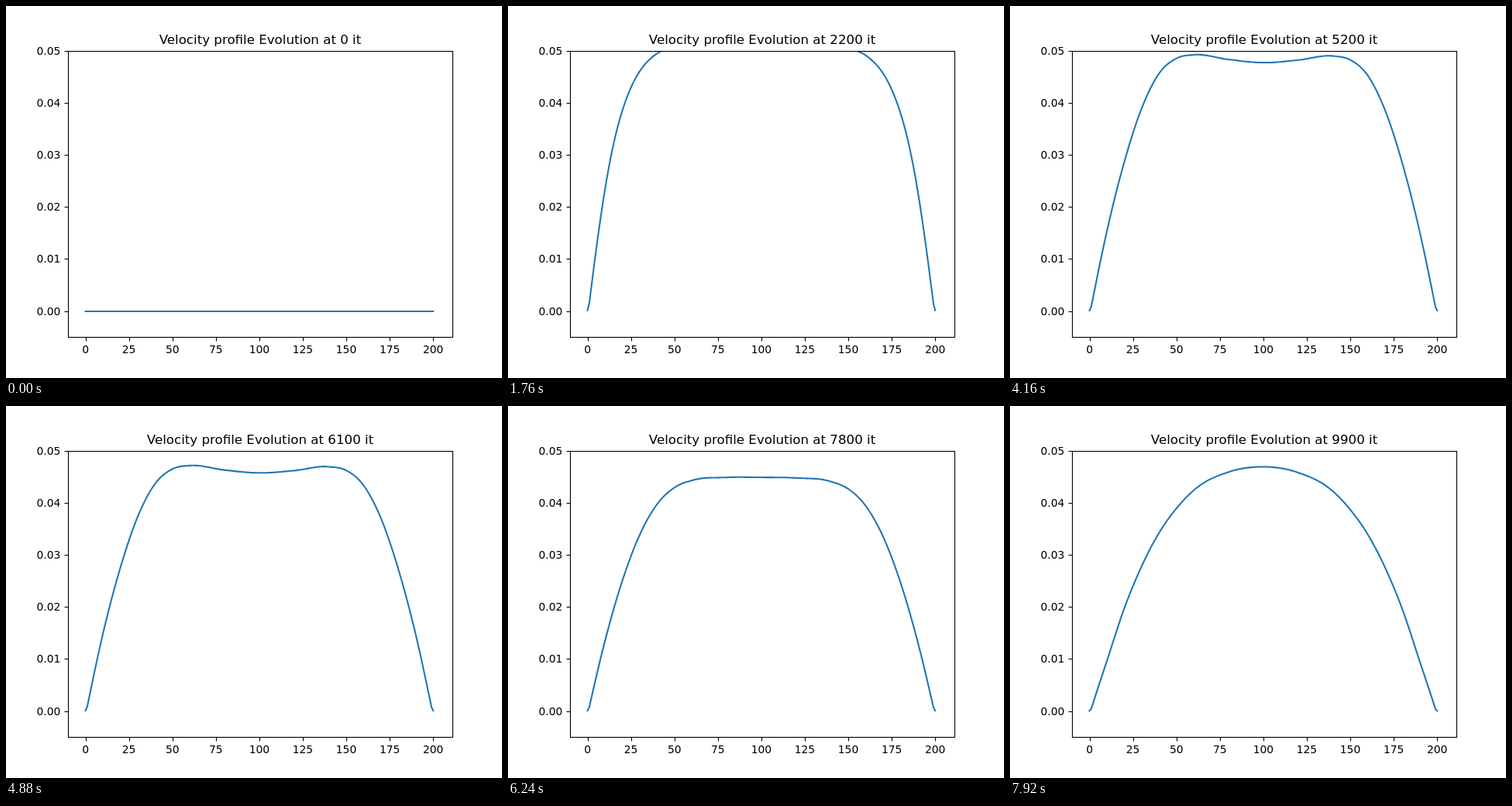
Write an HTML page that moves like this. It is 640 by 480 pixels and loops after 8 s.

```html
<!DOCTYPE html>
<html lang="en">
<head>
<meta charset="utf-8">
<title>Velocity profile</title>
<style>
  html, body { margin: 0; width: 100%; height: 100%; overflow: hidden; background: #fff; }
  svg { display: block; width: 640px; height: 480px; }
  text { font: 13.889px "DejaVu Sans", sans-serif; fill: #000; text-anchor: middle; }
  .ylab { text-anchor: end; }
  #title { font-size: 16.667px; }
  .axis { fill: none; stroke: #000; stroke-width: 1.11; }
  #curve { fill: none; stroke: #1f77b4; stroke-width: 2.083; stroke-linecap: square; stroke-linejoin: round; }
</style>
</head>
<body>
<svg viewBox="0 0 640 480">
  <clipPath id="plot"><rect x="80" y="58" width="496" height="369"/></clipPath>
  <g clip-path="url(#plot)"><path id="curve"/></g>
  <rect class="axis" x="80.5" y="58.5" width="496" height="369"/>
  <g id="ticks"></g>
  <text id="title" x="328" y="49"></text>
</svg>
<script>
const STEP = 80, STEPS = 100, ITERS = 100;
const px = x => 80 + (x + 10.05) * 496 / 221.1;
const py = u => 393.6 - u * 6720;

const ticks = document.getElementById('ticks');
const curve = document.getElementById('curve');
const title = document.getElementById('title');

function add(tag, attrs, text = '') {
  const el = document.createElementNS('http://www.w3.org/2000/svg', tag);
  for (const k in attrs) el.setAttribute(k, attrs[k]);
  el.textContent = text;
  ticks.append(el);
}

for (let v = 0; v <= 200; v += 25) {
  const x = Math.round(px(v)) + 0.5;
  add('path', { class: 'axis', d: `M${x} 427.5V432.5` });
  add('text', { x: px(v), y: 448 }, v);
}
for (let i = 0; i <= 5; i++) {
  const y = Math.round(py(i / 100)) + 0.5;
  add('path', { class: 'axis', d: `M80.5 ${y}H75.5` });
  add('text', { class: 'ylab', x: 70.3, y: y + 4.5 }, (i / 100).toFixed(2));
}

// Half-channel velocities (in 1e-4) at the knots, by iteration
const KNOTS = [1, 10, 20, 30, 40, 50, 60, 80, 100];
const PROFILES = [
  [3300, [9, 162, 298, 401, 460, 484.5, 490, 483, 478]],
  [5200, [8, 153, 286, 389, 456, 485, 492, 483, 477]],
  [7000, [8, 143, 264, 358, 418, 446, 452, 444, 439]],
  [8600, [6, 125, 236, 319, 377, 413, 434, 453, 458]],
  [9900, [4, 96, 197, 278, 342, 389, 424, 459, 469]]
];

const erf = x => Math.tanh(1.1284 * x + 0.1009 * x ** 3);

// Early boundary layer growing from the wall
function layer(x, it) {
  const core = 0.0535 * Math.min(1, it / 300);
  return core * erf((x - 0.45) / (16.5 * Math.sqrt(it / 1200)));
}

// Cubic Hermite through the knots, flat at the centre
function spline(v, x) {
  const last = KNOTS.length - 1;
  let i = 0;
  while (i < last - 1 && x > KNOTS[i + 1]) i++;
  const rise = k => (v[k + 1] - v[k]) / (KNOTS[k + 1] - KNOTS[k]);
  const slope = k => {
    if (k === 0) return rise(0) * 1.04;
    if (k === last) return 0;
    const a = KNOTS[k] - KNOTS[k - 1], b = KNOTS[k + 1] - KNOTS[k];
    return (rise(k - 1) * b + rise(k) * a) / (a + b);
  };
  const h = KNOTS[i + 1] - KNOTS[i], s = (x - KNOTS[i]) / h, r = 1 - s;
  return (v[i] * (1 + 2 * s) + slope(i) * h * s) * r * r
       + (v[i + 1] * (1 + 2 * r) - slope(i + 1) * h * r) * s * s;
}

function velocity(x, it) {
  if (it <= 1200) return layer(x, it);
  let b = 0;
  while (PROFILES[b][0] < it) b++;
  const from = b ? PROFILES[b - 1][0] : 1200;
  const [to, next] = PROFILES[b];
  const start = b ? spline(PROFILES[b - 1][1], x) / 1e4 : layer(x, 1200);
  const end = spline(next, x) / 1e4;
  const k = (Math.sqrt(it) - Math.sqrt(from)) / (Math.sqrt(to) - Math.sqrt(from));
  return start + (end - start) * k;
}

function profile(it) {
  if (it === 0) return `M${px(0)} 394H${px(200)}`;
  const pts = [];
  for (let x = 0; x <= 200; x++) {
    const wall = Math.min(x, 200 - x);
    const skew = 1 - 0.00012 * Math.max(0, x - 100);
    const u = velocity(Math.max(1, wall), it) * (wall ? skew : 0.1);
    pts.push(px(x).toFixed(2) + ' ' + py(u).toFixed(2));
  }
  return 'M' + pts.join('L');
}

let shown = -1;
function draw(now) {
  const step = Math.floor(now / STEP) % STEPS;
  if (step !== shown) {
    shown = step;
    curve.setAttribute('d', profile(step * ITERS));
    title.textContent = `Velocity profile Evolution at ${step * ITERS} it`;
  }
  requestAnimationFrame(t => draw(Math.max(0, t - origin)));
}
const origin = performance.now();
draw(0);
</script>
</body>
</html>
```
